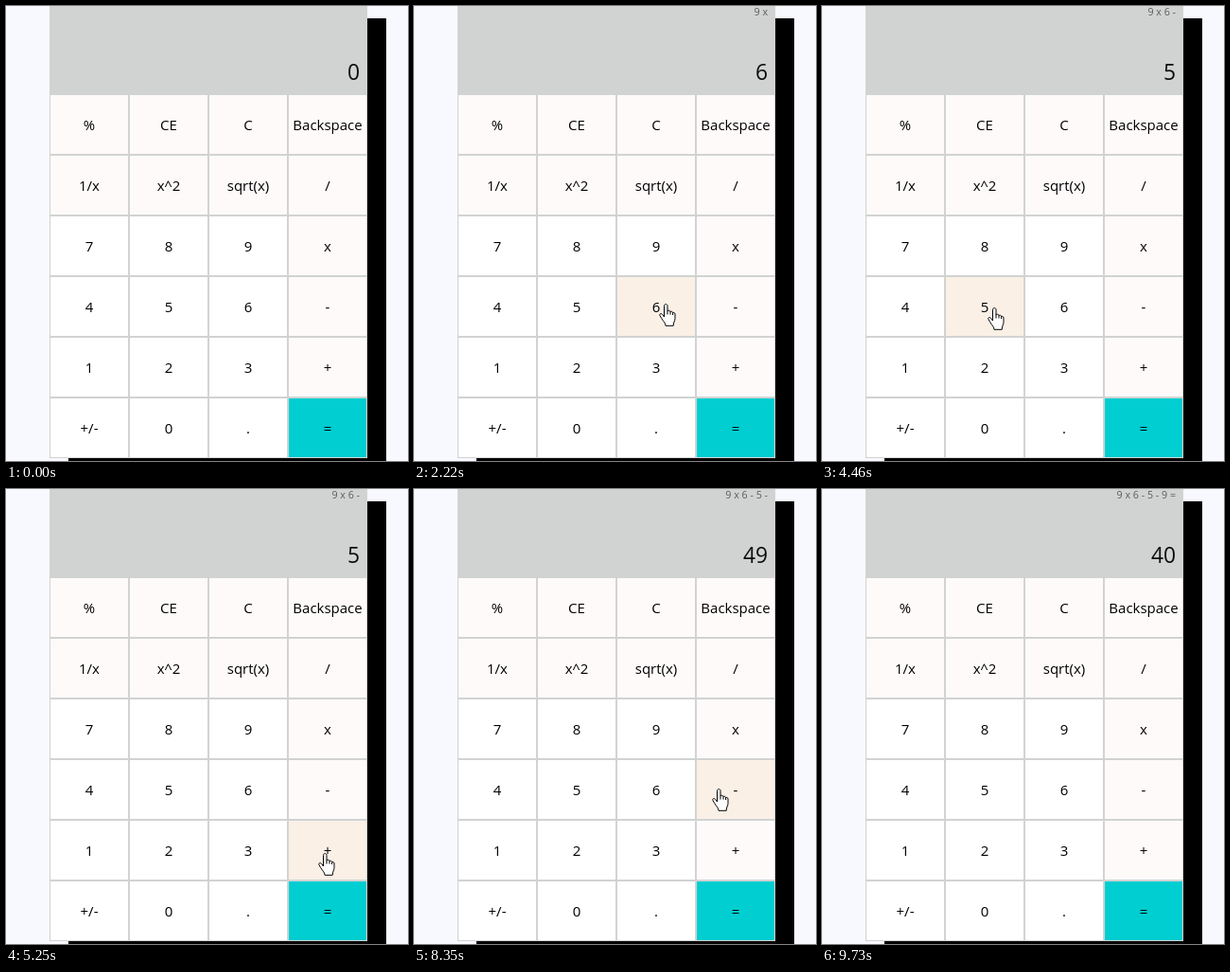
These frames come from a looping animation (425 px wide and 480 px high, 9960 ms). An HTML page with a canvas:

```html
<!DOCTYPE html>
<html lang="en">
<head>
<meta charset="utf-8">
<title>Calculator</title>
<style>
  html, body { margin: 0; width: 100%; height: 100%; overflow: hidden; background: #f8f8ff; }
  canvas { display: block; }
</style>
</head>
<body>
<canvas id="stage" width="425" height="480"></canvas>
<script>
const ctx = document.getElementById('stage').getContext('2d');
const LOOP = 9960, STEP = 76.6;
const FONT = '"Open Sans", "Noto Sans", sans-serif';
const GRAY = '#d1d3d2', SNOW = '#fffafa', LINEN = '#faf0e6', TURQUOISE = '#00ced1';
const LEFT = 46, TOP = 93, CELL_W = 84, CELL_H = 64;
const TIP = 6;

const rows = [
  ['%', 'CE', 'C', 'Backspace'],
  ['1/x', 'x^2', 'sqrt(x)', '/'],
  ['7', '8', '9', 'x'],
  ['4', '5', '6', '-'],
  ['1', '2', '3', '+'],
  ['+/-', '0', '.', '=']
];

// The pointer glides to each stop and presses the button beneath it.
const entry = { x: 372, y: 452 };
const stops = [
  { leave: 230, arrive: 690, press: 840, x: 269, y: 260 },
  { leave: 1070, arrive: 1300, press: 1610, x: 323, y: 266 },
  { leave: 1610, arrive: 1920, press: 2220, x: 259, y: 314 },
  { leave: 2850, arrive: 2990, press: 3310, x: 334, y: 321 },
  { leave: 3780, arrive: 4170, press: 4380, x: 175, y: 318 },
  { leave: 4950, arrive: 5250, press: 5480, x: 330, y: 384 },
  { leave: 6110, arrive: 6410, press: 6810, x: 337, y: 244 },
  { leave: 7350, arrive: 7490, press: 7720, x: 321, y: 322 },
  { leave: 8350, arrive: 8650, press: 8650, x: 263, y: 262 },
  { leave: 8725, arrive: 8950, press: 9120, x: 341, y: 446 }
];
const EXIT = 9730;

const operators = {
  'x': (a, b) => a * b,
  '/': (a, b) => a / b,
  '-': (a, b) => a - b,
  '+': (a, b) => a + b
};

const smooth = u => u * u * (3 - 2 * u);

function pointerAt(t) {
  if (t >= EXIT) return null;
  const i = stops.findLastIndex(stop => stop.leave <= t);
  if (i < 0) return null;
  const from = stops[i - 1] || entry, to = stops[i];
  const n = Math.round((to.arrive - to.leave) / STEP);
  const step = Math.floor((t - to.leave) / (to.arrive - to.leave) * n + 0.03) + 1;
  const k = smooth(Math.min(1, step / (n + 1)));
  return {
    x: Math.round(from.x + (to.x - from.x) * k),
    y: Math.round(from.y + (to.y - from.y) * k)
  };
}

const cellAt = ({ x, y }) => ({
  col: Math.floor((x + TIP - LEFT) / CELL_W),
  row: Math.floor((y - TOP) / CELL_H)
});

function pressKey(calc, key) {
  const { value, terms, total, op, typing } = calc;
  if (/\d/.test(key)) {
    return { ...calc, value: typing ? value * 10 + +key : +key, typing: true };
  }
  if (!typing) return { ...calc, terms: [...terms.slice(0, -1), key], op: key };
  const result = op ? operators[op](total, value) : value;
  return { value: result, terms: [...terms, value, key], total: result, op: key, typing: false };
}

function calcAt(t) {
  const clear = { value: 0, terms: [], total: 0, op: '', typing: false };
  return stops.filter(stop => stop.press <= t).reduce((calc, stop) => {
    const { row, col } = cellAt(stop);
    return pressKey(calc, rows[row][col]);
  }, clear);
}

function rect(x, y, w, h, color) {
  ctx.fillStyle = color;
  ctx.fillRect(x, y, w, h);
}

function text(str, x, y, size, align, color) {
  ctx.font = size + 'px ' + FONT;
  ctx.textAlign = align;
  ctx.fillStyle = color;
  ctx.fillText(str, x, y);
}

function buttonColor(label, row, col) {
  if (label === '=') return TURQUOISE;
  return row < 2 || col === 3 ? SNOW : '#fff';
}

function drawButtons(pointer) {
  const over = pointer ? cellAt(pointer) : {};
  rows.forEach((labels, row) => labels.forEach((label, col) => {
    const x = LEFT + col * CELL_W, y = TOP + row * CELL_H;
    const hover = row === over.row && col === over.col;
    rect(x + 1, y + 1, CELL_W - 2, CELL_H - 2, hover ? LINEN : buttonColor(label, row, col));
    text(label, x + CELL_W / 2, y + 38, 15, 'center', '#000');
  }));
}

const hand = new Path2D(
  'M5.5 14 V2.4 C5.5 0 9 0 9 2.4 V8 C9.2 6.7 12 6.9 12 8.8 ' +
  'C12.3 7.8 14.6 8 14.6 9.8 C15 9 17 9.4 17 11 V15.5 ' +
  'C17 18.5 15.2 19.3 15.2 23.3 H7 C7 20.2 4.2 18.4 2.8 15.6 ' +
  'L1 12.6 C0 10.6 2.4 9.8 3.6 11.4 Z');
const knuckles = new Path2D('M9 8 V11.5 M12 8.8 V11.5 M14.6 9.8 V12');

function drawHand({ x, y }) {
  ctx.save();
  ctx.translate(x, y);
  ctx.fillStyle = '#fff';
  ctx.strokeStyle = '#000';
  ctx.lineWidth = 1;
  ctx.lineJoin = 'round';
  ctx.fill(hand);
  ctx.stroke(hand);
  ctx.stroke(knuckles);
  ctx.restore();
}

function draw(t) {
  const pointer = pointerAt(t);
  const calc = calcAt(t);
  rect(0, 0, 425, 480, '#f8f8ff');
  rect(66, 13, 336, 467, '#000');
  rect(LEFT, 0, 336, 477, GRAY);
  text(calc.terms.join(' '), 374, 9.5, 10.7, 'right', '#5c5c5c');
  text(calc.value, 374, 78, 22.8, 'right', '#0c0c0c');
  drawButtons(pointer);
  if (pointer) drawHand(pointer);
}

const start = performance.now();
function tick() {
  draw((performance.now() - start) % LOOP);
  requestAnimationFrame(tick);
}
tick();
</script>
</body>
</html>
```
